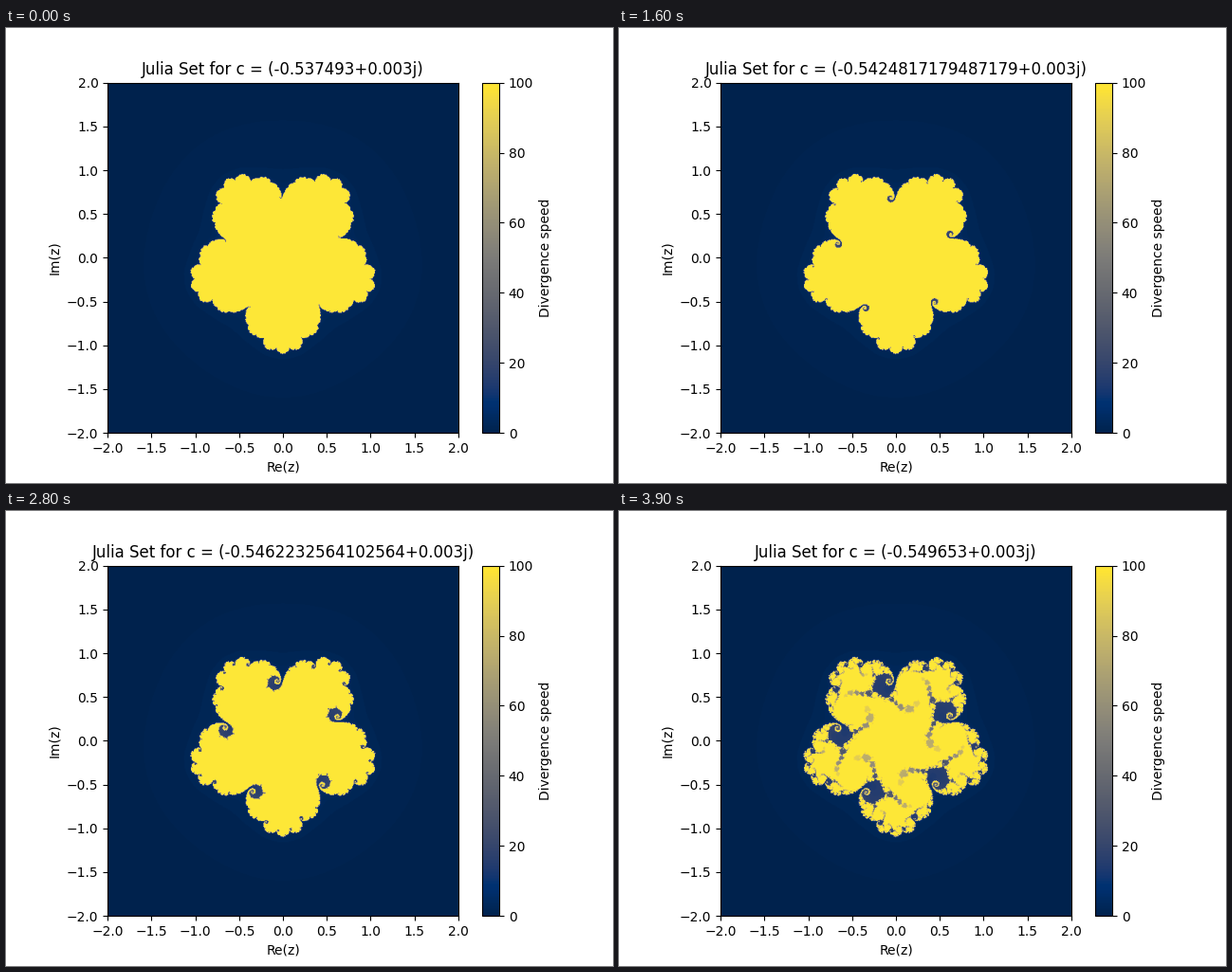
These frames come from a looping animation (640x480 px, 4 s). A matplotlib script:

```python
import numpy as np
import matplotlib.pyplot as plt
from matplotlib.animation import FuncAnimation

FRAMES = 40
INTERVAL = 100
SIZE = 500
MAX_ITER = 100
ESCAPE = 10
LIMIT = 2

axis = np.linspace(-LIMIT, LIMIT, SIZE)
grid = (axis[:, None] + 1j * axis[None, :]).ravel()
reals = np.linspace(-0.537493, -0.549653, FRAMES)


def julia(c):
    """Escape counts of z -> z**5 + c; rows follow Re(z), columns Im(z)."""
    counts = np.full(grid.size, MAX_ITER, dtype=float)
    alive = np.arange(grid.size)
    z = grid.copy()
    for n in range(MAX_ITER):
        square = z * z
        z = square * square * z + c
        gone = z.real ** 2 + z.imag ** 2 > ESCAPE ** 2
        if gone.any():
            counts[alive[gone]] = n
            alive, z = alive[~gone], z[~gone]
    return counts.reshape(SIZE, SIZE)


fig, ax = plt.subplots(figsize=(6.4, 4.8), dpi=100)
image = ax.imshow(np.zeros((SIZE, SIZE)), cmap="cividis", vmin=0, vmax=MAX_ITER,
                  extent=(-LIMIT, LIMIT, -LIMIT, LIMIT))
fig.colorbar(image, ax=ax, label="Divergence speed")
ax.set_xlabel("Re(z)")
ax.set_ylabel("Im(z)")
title = ax.set_title("")


def update(i):
    c = complex(reals[i], 0.003)
    image.set_data(julia(c))
    title.set_text(f"Julia Set for c = {c}")
    return image, title


anim = FuncAnimation(fig, update, frames=FRAMES, interval=INTERVAL,
                     init_func=lambda: (image, title), repeat=True, repeat_delay=0)
plt.show()
```
